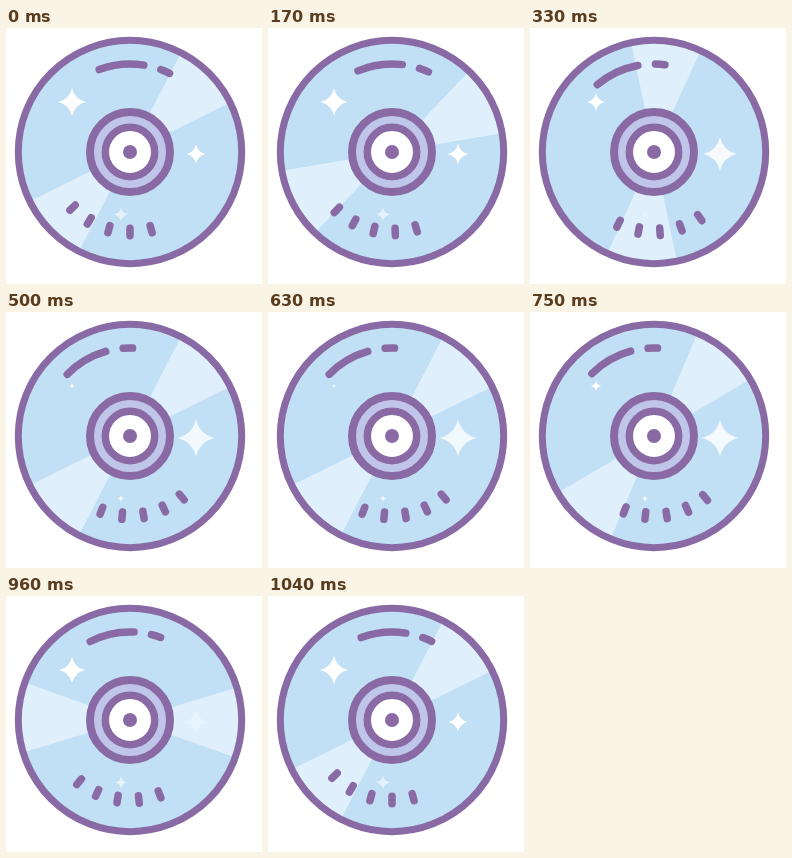
An HTML page with a canvas for the animation above (1.18 s loop, 256x256 px).

```html
<!DOCTYPE html>
<html lang="en">
<head>
<meta charset="utf-8">
<title>Spinning disc</title>
<style>
  html, body { margin: 0; width: 100%; height: 100%; overflow: hidden; background: #fff; }
  canvas { display: block; width: 100vw; height: 100vh; }
</style>
</head>
<body>
<canvas id="stage"></canvas>
<script>
const SIZE = 256, LOOP = 1180, FPS = 24;
const PURPLE = '#896aa4', BLUE = '#c1e0f5', LAVENDER = '#c0c6ea', SHINE = '#e5f2fe';
const C = 124;
const canvas = document.getElementById('stage');
const ctx = canvas.getContext('2d');
const ratio = window.devicePixelRatio || 1;
canvas.width = canvas.height = SIZE * ratio;

const rad = deg => deg * Math.PI / 180;
const clamp = x => Math.min(1, Math.max(0, x));
const sineInOut = x => (1 - Math.cos(Math.PI * x)) / 2;
const mix = (a, b, p) => a + (b - a) * p;

// Step start times are rounded to hundredths of a second.
const stepStart = k => 10 * Math.round(k * 100 / FPS);
function stepAt(t) {
  let k = Math.floor(t * FPS / 1000) + 1;
  while (stepStart(k) > t) k--;
  return k;
}

function circle(r, fill, line) {
  ctx.beginPath();
  ctx.arc(0, 0, r, 0, 2 * Math.PI);
  if (fill) { ctx.fillStyle = fill; ctx.fill(); }
  if (line) { ctx.strokeStyle = PURPLE; ctx.lineWidth = line; ctx.stroke(); }
}

function star(x, y, r, alpha) {
  const c = r * 0.19;
  ctx.save();
  ctx.translate(x - C, y - C);
  ctx.globalAlpha = alpha;
  ctx.fillStyle = '#fff';
  ctx.beginPath();
  ctx.moveTo(0, -r);
  ctx.quadraticCurveTo(c, -c, r, 0);
  ctx.quadraticCurveTo(c, c, 0, r);
  ctx.quadraticCurveTo(-c, c, -r, 0);
  ctx.quadraticCurveTo(-c, -c, 0, -r);
  ctx.fill();
  ctx.restore();
}

function shine(deg) {
  const half = rad(18.3);
  ctx.save();
  ctx.rotate(rad(deg));
  ctx.globalAlpha = 0.85;
  ctx.fillStyle = SHINE;
  for (const side of [0, Math.PI]) {
    ctx.beginPath();
    ctx.moveTo(0, 0);
    ctx.arc(0, 0, 111, side - half, side + half);
    ctx.fill();
  }
  ctx.restore();
}

function marks(deg) {
  ctx.save();
  ctx.rotate(rad(deg));
  ctx.strokeStyle = PURPLE;
  ctx.lineWidth = 7.5;
  ctx.lineCap = 'round';
  for (const [from, to] of [[-110.5, -81], [-69.5, -63.3]]) {
    ctx.beginPath();
    ctx.arc(0, 0, 88, rad(from), rad(to));
    ctx.stroke();
  }
  for (let i = 0; i < 5; i++) {
    const a = rad(74.7 + i * 15.3), x = Math.cos(a), y = Math.sin(a);
    ctx.beginPath();
    ctx.moveTo(76.3 * x, 76.3 * y);
    ctx.lineTo(83.7 * x, 83.7 * y);
    ctx.stroke();
  }
  ctx.restore();
}

function draw(t) {
  // The motion runs out and back, mirrored around step 14.
  const k = stepAt(t);
  const away = 11 - Math.abs(k - 14);
  const turn = sineInOut(Math.pow(clamp(away / 8), 0.785));
  const fade = sineInOut(clamp(away / 11));

  ctx.setTransform(ratio, 0, 0, ratio, 0, 0);
  ctx.fillStyle = '#fff';
  ctx.fillRect(0, 0, SIZE, SIZE);
  ctx.translate(C, C);

  circle(111.7, BLUE);
  star(66, 74, mix(14, 1.5, fade), 1);
  star(190, 126, mix(9.5, 18.7, turn), mix(1, 0.8, turn));
  star(115, 186.5, mix(7, 3, turn), mix(0.55, 0.8, turn));
  shine(-44.5 + 180 * turn);
  circle(111.7, null, 7);
  marks(-25 * turn);

  circle(40, LAVENDER, 8);
  circle(24.7, '#fff', 7.5);
  circle(7, PURPLE);
}

const begin = performance.now();
function tick() {
  draw((performance.now() - begin) % LOOP);
  requestAnimationFrame(tick);
}
tick();
</script>
</body>
</html>
```
